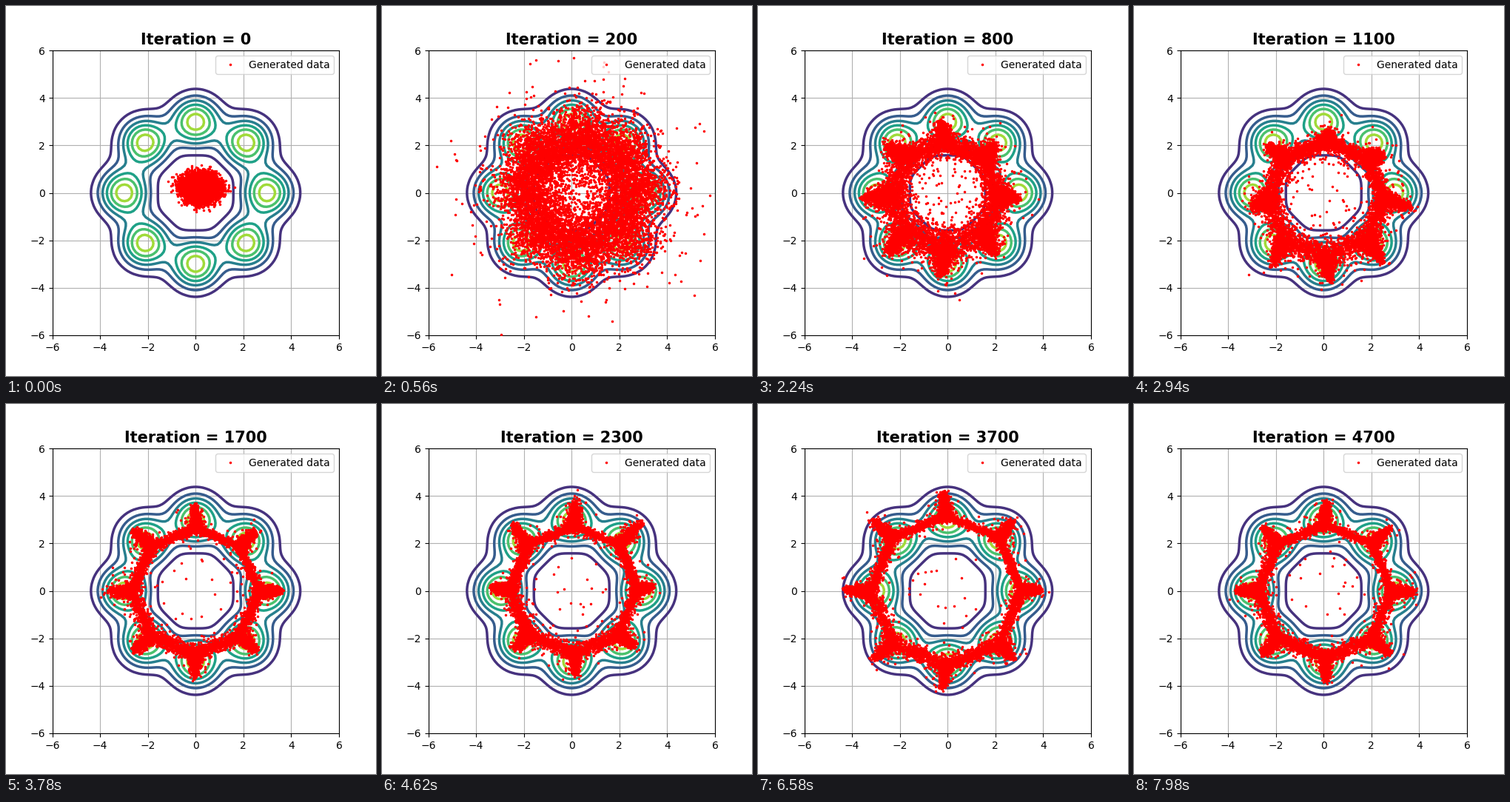
Animation of 500 by 500 pixels, one loop 8000 ms. Source, as a matplotlib script:

```python
import numpy as np
import matplotlib.pyplot as plt
from matplotlib.animation import FuncAnimation

LOOP, INTERVAL, STEP = 8000, 40, 140
N_ARMS, N_RING = 5000, 5000
ANGLES = np.arange(8) * np.pi / 4
MODES = np.exp(1j * ANGLES)

# The ring breathes and drifts between a few key steps.
KEYS = np.array([9, 16, 27, 38, 47, 57])
RADIUS = [2.9, 2.25, 2.65, 2.7, 3.15, 2.8]
DRIFT = [0.3 + 0.1j, -0.3 - 0.25j, -0.05, 0.35 + 0.35j, -0.2 + 0.05j, 0.1]
ARM = 0.95


def spread_at(k):
    """Thickness of the ring, sharpening once training settles."""
    return 0.09 + 0.14 / (1 + np.exp((k - 21) / 1.5))


def pose(k, rng):
    """Hub and tip of each arm, as complex numbers."""
    radius = np.interp(k, KEYS, RADIUS)
    drift = np.interp(k, KEYS, DRIFT)
    # Training wanders between the key steps.
    away = min(np.abs(KEYS - k).min() / 4, 1) * (0.1 + 2 * spread_at(k))
    drift = drift + 0.5 * away * (rng.normal() + 1j * rng.normal())
    stretch = ARM + 0.6 * away * rng.normal(size=8)
    hub = radius * MODES + 0.4 * drift
    tip = (radius + stretch) * MODES + drift
    return hub, tip


def noise(rng, n):
    """Complex normal noise with some far outliers."""
    far = np.where(rng.random(n) < 0.06, 2.6, 1)
    return far * (rng.normal(size=n) + 1j * rng.normal(size=n))


def samples(k):
    """Generated points at step k, as complex numbers."""
    rng = np.random.default_rng(100 + k)
    n = N_ARMS + N_RING
    blob = rng.normal(0.18, 0.34, n) + 1j * rng.normal(0.22, 0.26, n)
    if k == 0:
        return blob
    hub, tip = pose(k, rng)
    spread = spread_at(k)

    # Arms reach out from each hub and taper towards the tip.
    arm = rng.integers(0, 8, N_ARMS)
    u = rng.beta(0.9, 1.4, N_ARMS)
    width = (0.1 + 0.5 * spread) * (1 - 0.5 * u)
    arms = hub[arm] + (tip - hub)[arm] * u + width * noise(rng, N_ARMS)

    # Links join neighbouring hubs; those at the lower left are looser.
    link = rng.integers(0, 8, N_RING)
    t = rng.beta(0.75, 0.75, N_RING)
    loose = 1.3 - 0.4 * np.cos(ANGLES[link] - np.pi / 4)
    ring = hub[link] * (1 - t) + np.roll(hub, -1)[link] * t
    ring = ring + spread * loose * noise(rng, N_RING)

    pts = np.concatenate([arms, ring])
    m = int(230 * spread)
    pts[-m:] = 1.8 * np.sqrt(rng.random(m)) * np.exp(2j * np.pi * rng.random(m))

    if k < KEYS[0]:
        grow = min(k / 6, 1)
        grow = grow * grow * (3 - 2 * grow)
        haze = 0.6 * np.sin(np.pi * k / KEYS[0])
        pts = blob * (1 - grow) + pts * grow + haze * noise(rng, n)
    return pts


fig, ax = plt.subplots(figsize=(5, 5), dpi=100)
ax.set(xlim=(-6, 6), ylim=(-6, 6))
ax.grid(True)

# Density of eight equal Gaussians on a circle of radius 3.
axis = np.linspace(-6, 6, 100)
X, Y = np.meshgrid(axis, axis)
density = sum(np.exp(-np.abs(X + 1j * Y - 3 * m) ** 2) for m in MODES) / (8 * np.pi)
ax.contour(X, Y, density, levels=np.arange(8) * 0.006, cmap="viridis",
           linewidths=2.5)

dots, = ax.plot([], [], "r.", markersize=3, zorder=3, label="Generated data")
ax.legend(loc="upper right")
title = ax.set_title("", fontsize=15, fontweight="bold")


def update(i):
    k = (i * INTERVAL + INTERVAL // 2) // STEP
    pts = samples(k)
    dots.set_data(pts.real, pts.imag)
    title.set_text(f"Iteration = {50 * k if k <= 20 else 100 * (k - 10)}")
    return dots, title


anim = FuncAnimation(fig, update, frames=LOOP // INTERVAL, interval=INTERVAL,
                     repeat=True, repeat_delay=0)
plt.show()
```
